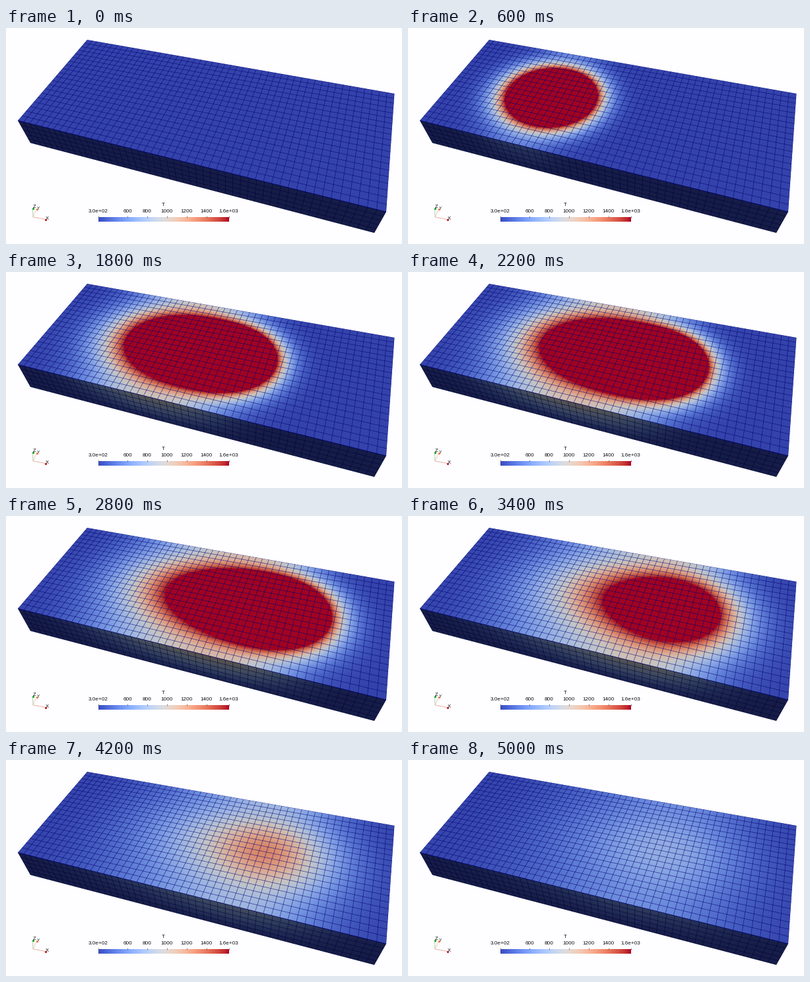
Write a matplotlib script that moves like this. It is 600 px wide and 329 px high and loops after 5.1 s.

```python
import numpy as np
import matplotlib.pyplot as plt
from matplotlib.animation import FuncAnimation
from matplotlib.collections import LineCollection
from matplotlib.path import Path

W, H = 600, 329
FRAMES, INTERVAL = 51, 100
PX = 0.72  # points per pixel at 100 dpi

# Slab corners on the stage
BACK_L, BACK_R = (123, 18), (588.5, 100)
FRONT_L, FRONT_R = (18, 141), (576, 280)
LOW_L, LOW_R = (37, 175), (558, 312)
CELLS_X, CELLS_Y, CELLS_Z = 50, 20, 5

# Plate: length 2.5, width 1; time is counted in frames
LENGTH = 2.5
T_MIN, T_MAX = 300, 1600
START_X, SPEED, OFF_TIME = 0.65, 0.05, 25.5
POWER, LOSS = 2200, 0.085
SPOT, DIFFUSION = 0.022, 0.0015
STEP = 0.25


def homography(corners):
    """Matrix taking (0,0), (1,0), (1,1), (0,1) to the given corners."""
    rows, rhs = [], []
    for (u, v), (x, y) in zip([(0, 0), (1, 0), (1, 1), (0, 1)], corners):
        rows.append([u, v, 1, 0, 0, 0, -u * x, -v * x])
        rows.append([0, 0, 0, u, v, 1, -u * y, -v * y])
        rhs += [x, y]
    return np.append(np.linalg.solve(rows, rhs), 1).reshape(3, 3)


def project(m, a, b):
    x, y, w = np.tensordot(m, np.array([a, b, np.ones_like(a)]), 1)
    return x / w, y / w


def grid_lines(m, nu, nv):
    ends = [((i / nu, 0), (i / nu, 1)) for i in range(nu + 1)]
    ends += [((0, j / nv), (1, j / nv)) for j in range(nv + 1)]
    uv = np.array(ends)
    return np.stack(project(m, uv[..., 0], uv[..., 1]), axis=-1)


top = homography([FRONT_L, FRONT_R, BACK_R, BACK_L])
front = homography([FRONT_L, FRONT_R, LOW_R, LOW_L])

# Where each pixel lies on the plate
NX, NY = 601, 241
px, py = np.meshgrid(np.arange(W) + 0.5, np.arange(H) + 0.5)
top_u, top_v = project(np.linalg.inv(top), px, py)
front_u, front_d = project(np.linalg.inv(front), px, py)
on_front = top_v < 0
u = np.clip(np.where(on_front, front_u, top_u), 0, 1)
v = np.clip(top_v, 0, 1)
col = np.rint(u * (NX - 1)).astype(int)
row = np.rint(v * (NY - 1)).astype(int)
depth_fade = np.where(on_front, 1 - np.clip(front_d, 0, 1), 1)
shade = np.where(on_front, 0.37, 0.89)[..., None]

xs = np.linspace(0, LENGTH, NX)
ys = np.linspace(0, 1, NY)


def heat(n):
    """Temperature rise on the top face from all spots laid down so far."""
    born = np.arange(STEP / 2, min(n, OFF_TIME), STEP)[:, None]
    age = n - born
    var = SPOT + 2 * DIFFUSION * age
    weight = POWER * STEP * np.exp(-LOSS * age) * SPOT / var
    gx = np.exp(-(xs - START_X - SPEED * born) ** 2 / (2 * var))
    # mirrored spots keep the long sides insulated
    gy = sum(np.exp(-(ys - c) ** 2 / (2 * var)) for c in (-0.5, 0.5, 1.5))
    return (weight * gy).T @ gx


def picture(n):
    rise = heat(n)[row, col] * depth_fade
    rgb = plt.cm.coolwarm(np.clip(rise / (T_MAX - T_MIN), 0, 1))[..., :3]
    return (rgb * shade * 255).astype(np.uint8)


plt.rcParams["font.family"] = "Liberation Sans"
fig = plt.figure(figsize=(W / 100, H / 100), dpi=100, facecolor="#fefdff")
ax = fig.add_axes([0, 0, 1, 1])
ax.axis("off")

slab = ax.imshow(picture(0), extent=(0, W, H, 0), interpolation="nearest")
outline = Path([BACK_L, BACK_R, FRONT_R, LOW_R, LOW_L, FRONT_L, BACK_L])
slab.set_clip_path(outline, transform=ax.transData)

for m, rows, color in ((front, CELLS_Z, (0, 0, 0.2)), (top, CELLS_Y, (0, 0, 0.45))):
    mesh = LineCollection(grid_lines(m, CELLS_X, rows), colors=[color],
                          linewidths=0.7 * PX, alpha=0.7)
    ax.add_collection(mesh)
    mesh.set_clip_path(outline, transform=ax.transData)


def label(x, y, text, size=8.1, color="#111111"):
    ax.text(x, y, text, fontsize=size * PX, color=color, ha="center", va="center")


def line(x0, y0, x1, y1, color, width=0.8):
    ax.plot([x0, x1], [y0, y1], color=color, lw=width * PX, solid_capstyle="butt")


# Colour legend
ax.imshow(np.linspace(0, 1, 256)[None], cmap="coolwarm", aspect="auto",
          extent=(139.5, 337.5, 295, 288.4), interpolation="nearest")
label(238.5, 269.3, "T")
ticks = [(139.5, "3.0e+02"), (337.5, "1.6e+03")]
ticks += [(184 + 30 * i, str(600 + 200 * i)) for i in range(5)]
for x, text in ticks:
    label(x, 279.5, text)
    line(x, 285.5, x, 289, "#666666", 0.7)

# Axis triad
for x, y, dot, stem in ((60, 291.5, "#c02020", "#eaa090"),
                        (46.5, 276, "#e08050", "#f0c0a0"),
                        (40.5, 274.5, "#20a030", "#a0c8a0")):
    line(41, 288, x, y, stem)
    ax.plot(x, y, "o", ms=3.2 * PX, mew=0, color=dot)
label(62.3, 291, "X", 7.5)
label(49.5, 274.5, "Y", 6.5)
label(43, 273, "Z", 7.5)

ax.set_xlim(0, W)
ax.set_ylim(H, 0)
ax.set_aspect("auto")


def update(n):
    slab.set_data(picture(n))
    return [slab]


anim = FuncAnimation(fig, update, frames=FRAMES, interval=INTERVAL, repeat=True)
plt.show()
```
